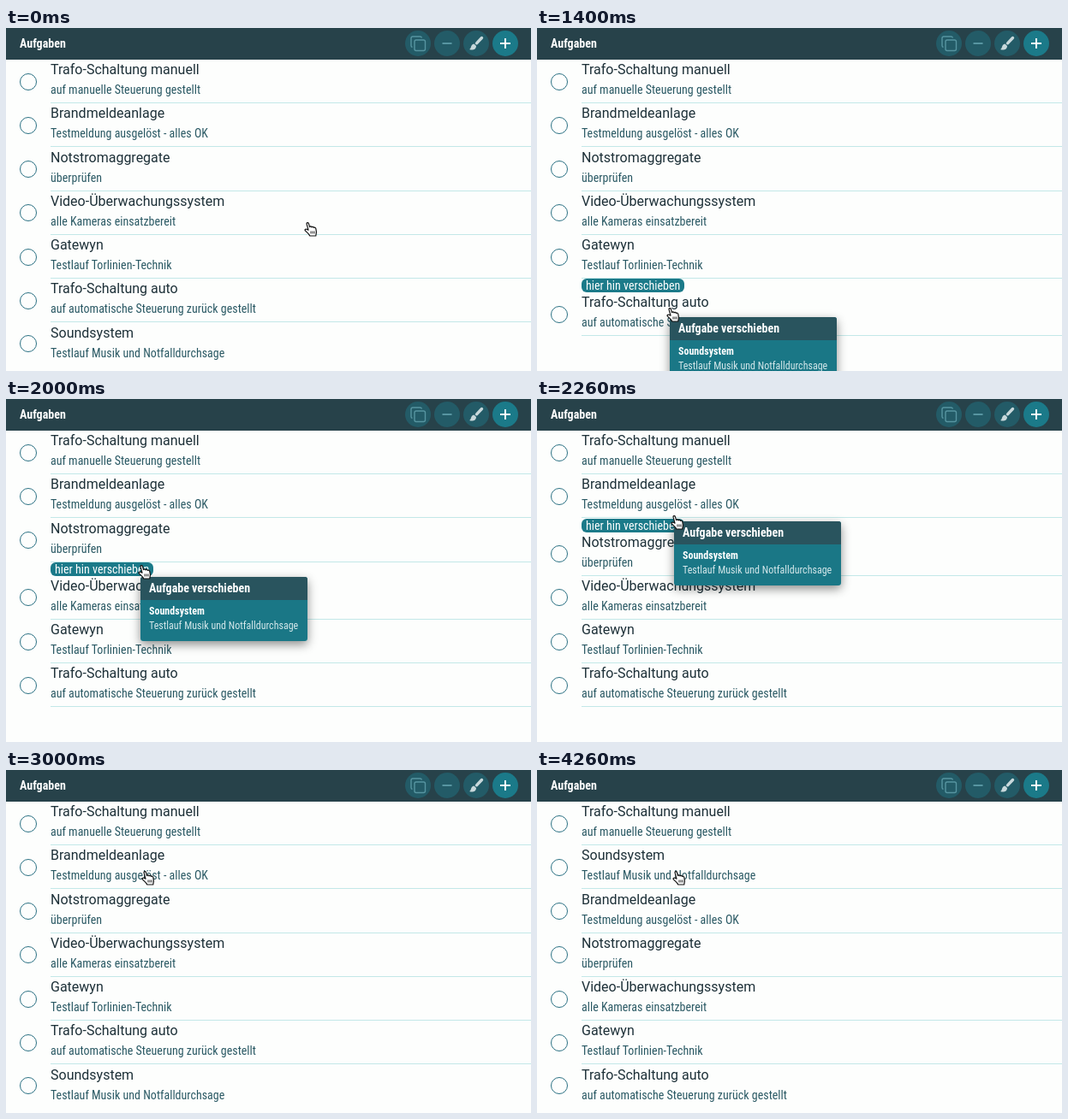
These frames come from a looping animation (613 px wide and 401 px high, 5.16 s). An HTML page:

```html
<!DOCTYPE html>
<html lang="de">
<head>
<meta charset="utf-8">
<title>Aufgaben</title>
<style>
html, body { margin: 0; width: 100%; height: 100%; overflow: hidden; }
body { position: relative; background: #fdfefd; font: 14px/20px "Roboto Condensed", Roboto, sans-serif; font-stretch: 75%; white-space: nowrap; }
body *, svg { position: absolute; box-sizing: border-box; }
svg * { position: static; }
header { left: 0; top: 0; width: 613px; height: 37px; background: #27424a; color: #fff; font-weight: 700; }
header b { left: 16px; top: 8px; }
.row { left: 0; width: 613px; height: 52px; }
.row i { left: 16px; top: 16.5px; width: 20px; height: 20px; border: 1.3px solid #2b7183; border-radius: 50%; }
.row b { left: 52px; top: 3px; font: 16px/20px Roboto, sans-serif; font-stretch: 100%; color: #1d3038; }
.row span { left: 52px; top: 26px; color: #2a5964; }
.row u { left: 52px; right: 0; top: 51px; height: 1px; background: #c3e8e8; }
.last i { top: 15.5px; }
.last u { display: none; }
#pill { left: 52px; width: 120px; height: 16px; padding-left: 5px; border-radius: 6px; background: #1b7a89; color: #fff; line-height: 16px; }
#card { width: 195px; height: 75px; border-radius: 3px; background: #1a7786; color: #fff; font-size: 12px; overflow: hidden; }
#drag { width: 195px; height: 75px; border-radius: 3px; box-shadow: 0 4px 12px rgba(0, 0, 0, .45); }
#card * { left: 0; padding-left: 10px; }
#card h1 { margin: 0; top: 0; width: 100%; height: 27px; background: #29545e; font-size: 14px; line-height: 27px; }
#card b { top: 30px; }
#card span { top: 47px; color: #d5e8eb; }
</style>
</head>
<body>
<header>
  <b>Aufgaben</b>
  <svg width="613" height="37" fill="none" stroke-width="1.4">
    <g fill="#235b67">
      <circle cx="481" cy="18" r="15"/><circle cx="515" cy="18" r="15"/><circle cx="549" cy="18" r="15"/>
    </g>
    <circle cx="583" cy="18" r="15" fill="#1b7a89"/>
    <g stroke="#5795a1">
      <rect x="477" y="14" width="12.5" height="12.5" rx="2"/>
      <path d="M474.500 22.500Q473 22 473 20.500V12Q473 10 475 10H483.500Q485 10 485.500 11.500"/>
      <path d="M509.500 18H520.500" stroke-width="2"/>
    </g>
    <path d="M555.500 11.500L549.500 17.800" stroke="#c8d8db" stroke-width="3.400" stroke-linecap="round"/>
    <path d="M546.500 18.500L549 21C549 25 545 26.500 541 25C543.500 24 542.500 19 546.500 18.500Z" fill="#c8d8db"/>
    <path d="M577 18H589M583 12V24" stroke="#fff" stroke-width="2"/>
  </svg>
</header>
<div id="list"></div>
<div id="pill">hier hin verschieben</div>
<div id="drag">
  <div id="card"><h1>Aufgabe verschieben</h1><b>Soundsystem</b><span>Testlauf Musik und Notfalldurchsage</span></div>
</div>
<svg id="hand" width="17" height="20" fill="#fff" stroke="#111" stroke-width="1.2" stroke-linejoin="round">
  <path d="M5 10.200L3.100 3.200C2.700 1.500 4.900.9 5.400 2.600L6.600 6.600C7.300 5.600 8.800 5.800 9 6.900C9.700 6 11.200 6.300 11.400 7.400C12.300 6.800 13.600 7.300 13.800 8.600L14.400 12C14.600 13.600 13.900 14.800 13.800 17H6.800C6 14.800 3.800 13.400 1.600 11.200C.4 9.800 1.800 8.600 3.200 9.300Z"/>
  <path d="M8 11.500V14.500M10 11.500V14.500M12 11.500V14.500" stroke-width=".9"/>
</svg>
<script>
const LOOP = 5160, DRAG = 1230, DROP = 3000, ROW = 51.25, GAP = 16;
const $ = id => document.getElementById(id);
const tasks = [
  ['Trafo-Schaltung manuell', 'auf manuelle Steuerung gestellt'],
  ['Brandmeldeanlage', 'Testmeldung ausgelöst - alles OK'],
  ['Notstromaggregate', 'überprüfen'],
  ['Video-Überwachungssystem', 'alle Kameras einsatzbereit'],
  ['Gatewyn', 'Testlauf Torlinien-Technik'],
  ['Trafo-Schaltung auto', 'auf automatische Steuerung zurück gestellt'],
  ['Soundsystem', 'Testlauf Musik und Notfalldurchsage']
];
const rows = tasks.map(([title, note]) => {
  const row = document.createElement('div');
  row.innerHTML = `<i></i><b>${title}</b><span>${note}</span><u></u>`;
  $('list').append(row);
  return row;
});

const progress = (t, from, to) => Math.min(1, Math.max(0, (t - from) / (to - from)));
const easeOut = (p, power) => 1 - (1 - p) ** power;
const rowTop = slot => 36 + ROW * slot;

function place(el, x, y) {
  el.style.left = x + 'px';
  el.style.top = y + 'px';
}

// Approach the last row, drag it upwards, then settle
function pointer(t) {
  const a = easeOut(progress(t, 0, 1000), 2.05);
  const b = progress(t, DRAG, 2260);
  const c = easeOut(progress(t, 2260, 2600), 4);
  return [348 - 197 * a + 5 * b * b + 2 * c, 226 + 138 * a - 229 * b - 18 * c].map(Math.round);
}

// The list is re-sorted in three quick updates after the drop
function orderAt(t) {
  if (t < 3900) return '0123456';
  if (t < 4000) return '0612453';
  return t < 4260 ? '0612435' : '0612345';
}

function render(t) {
  const dragging = t >= DRAG && t < DROP;
  // The dragged card follows the pointer at a coarser rate
  const tick = Math.max(DRAG, 1656 + 73 * Math.floor((t - 1656) / 73));
  const [cardX, cardY] = pointer(tick).map(v => v + 4);
  const gap = dragging ? Math.floor((cardY - 39) / ROW) : 7;

  [...orderAt(t)].forEach((task, slot) => {
    const row = rows[task];
    row.className = slot === 6 ? 'row last' : 'row';
    row.hidden = dragging && slot === 6;
    place(row, 0, rowTop(slot) + (slot >= gap ? GAP : 0));
  });
  $('pill').hidden = $('drag').hidden = !dragging;
  place($('pill'), 52, rowTop(gap) + 1);
  place($('drag'), cardX, cardY);
  place($('hand'), ...pointer(t));
}

function frame() {
  render(performance.now() % LOOP);
  requestAnimationFrame(frame);
}
frame();
</script>
</body>
</html>
```
